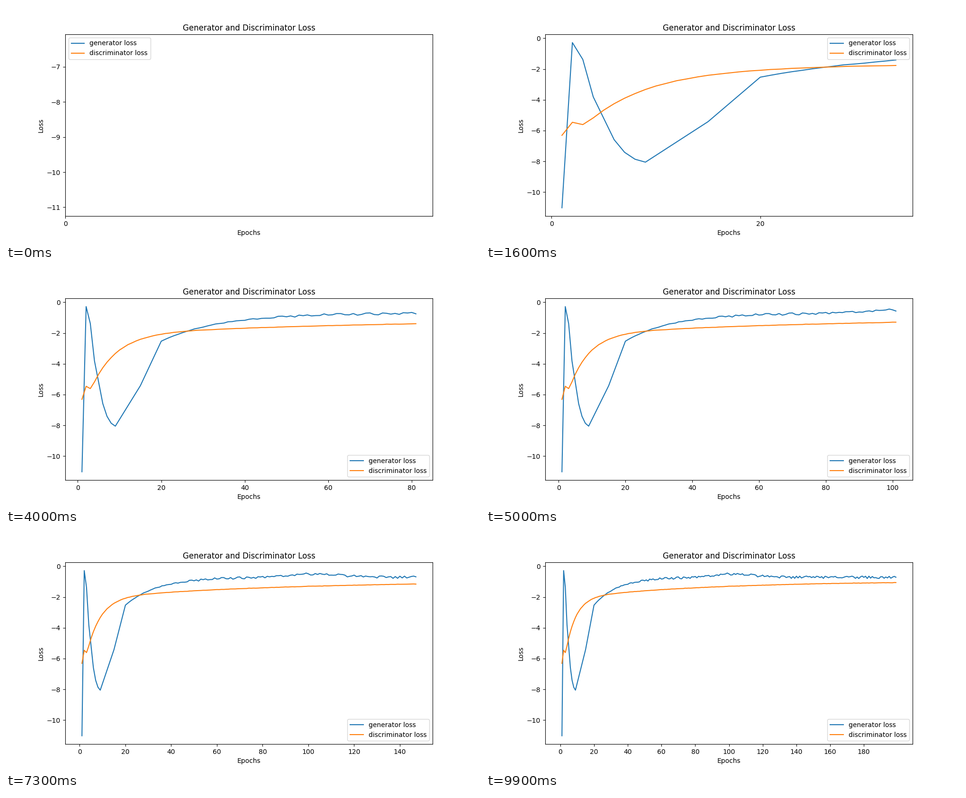
Animation of 1000x500 px, one loop 10000 ms. Source, as a matplotlib script:

```python
import numpy as np
import matplotlib.pyplot as plt
from matplotlib.animation import FuncAnimation

FRAMES = 100
EPOCHS = np.arange(1, 2 * FRAMES)
SETTLE = 20  # epoch at which the generator leaves its opening swing

# Corners of the generator's opening swing: (epoch, loss)
SWING = [(1, -11.014), (2, -0.2825), (3, -1.38), (4, -3.81), (6, -6.59),
         (7, -7.41), (8, -7.86), (9, -8.05), (15, -5.42), (SETTLE, -2.53)]


def generator_loss(rng):
    """Opening swing, then a decay to a plateau with a low hump and noise."""
    late = EPOCHS - SETTLE
    plateau = -0.72 - 1.81 * np.exp(-late / 14)
    hump = 0.22 * np.exp(-((EPOCHS - 102) / 18) ** 2)
    noise = rng.uniform(-0.08, 0.08, EPOCHS.size) * np.clip(late / 40, 0, 1)
    swing = np.interp(EPOCHS, *zip(*SWING))
    return np.where(late > 0, plateau + hump + noise, swing)


def discriminator_loss(rng):
    """A fast and a slow exponential after a short kink."""
    fast = 3.11 * np.exp(-(EPOCHS - 4) / 5.87)
    slow = 1.175 * np.exp(-EPOCHS / 84)
    loss = -0.95 - fast - slow + rng.normal(0, 0.005, EPOCHS.size)
    loss[:3] = -6.308, -5.46, -5.61
    return loss


rng = np.random.default_rng(4)
gen = generator_loss(rng)
disc = discriminator_loss(rng)

fig, ax = plt.subplots(figsize=(10, 5), dpi=100)


def draw(frame):
    n = 2 * frame + 1
    ax.clear()
    ax.plot(EPOCHS[:n], gen[:n], label="generator loss")
    ax.plot(EPOCHS[:n], disc[:n], label="discriminator loss")
    ax.set_title("Generator and Discriminator Loss")
    ax.set_xlabel("Epochs")
    ax.set_ylabel("Loss")
    ax.set_xticks(range(0, n, 20))
    ax.legend(loc="best")
    return ax.lines


anim = FuncAnimation(fig, draw, frames=FRAMES, interval=100,
                     repeat=True, repeat_delay=0, blit=False)
plt.show()
```
